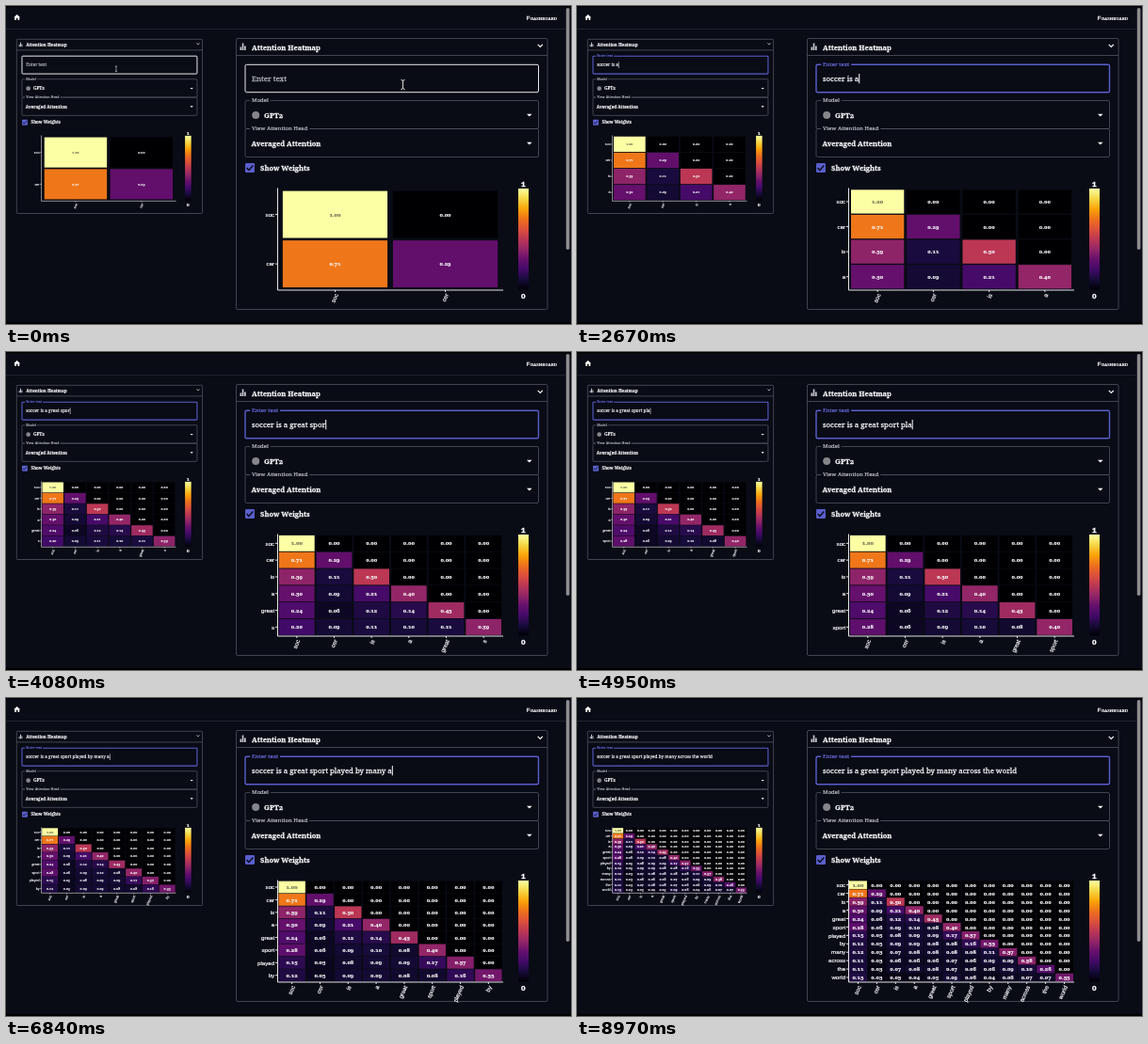
An HTML page for the animation above (9000 ms loop, 600 by 338 pixels).

```html
<!DOCTYPE html>
<html lang="en">
<head>
<meta charset="utf-8">
<title>Attention Heatmap</title>
<style>
  html, body { margin: 0; width: 100%; height: 100%; overflow: hidden; background: #090b15; }
  svg { display: block; width: 100vw; height: 100vh; }
  text {
    font-family: "Noto Serif", serif; font-variant-numeric: oldstyle-nums; white-space: pre;
    color: #f6f6f8; fill: currentColor; stroke: currentColor; stroke-width: .035em;
  }
  text.tick { font-family: "Liberation Sans", sans-serif; }
</style>
</head>
<body>
<svg id="stage" viewBox="0 0 600 338"></svg>
<script>
const LOOP = 9000, FOCUS = 480, BG = '#090b15', ACCENT = '#595fcb';
const SENTENCE = 'soccer is a great sport played by many across the world';

// [characters, first key, last key] in ms
const BURSTS = [[6, 900, 1400], [3, 1800, 2000], [2, 2150, 2250], [6, 2700, 3250],
  [5, 3500, 4050], [1, 4200, 4200], [7, 4650, 5200], [3, 5830, 6020],
  [5, 6150, 6480], [7, 6700, 7200], [4, 7880, 8090], [6, 8150, 8430]];
const KEYS = BURSTS.flatMap(([n, a, b]) =>
  Array.from({ length: n }, (_, i) => a + (b - a) * i / Math.max(1, n - 1)));

// token, time it enters the chart, weights in hundredths
const ROWS = [
  ['soc', 0, '100'],
  ['cer', 0, '71 29'],
  ['is', 2300, '39 11 50'],
  ['a', 2600, '30 9 21 40'],
  ['great', 3650, '24 6 12 14 43'],
  ['sport', 4600, '28 6 9 10 8 40'],
  ['played', 5640, '15 5 8 9 9 17 37'],
  ['by', 6450, '12 5 9 9 8 8 16 33'],
  ['many', 6950, '12 3 7 8 8 8 8 11 37'],
  ['across', 7650, '11 3 6 6 6 7 6 9 9 38'],
  ['the', 8350, '11 3 7 8 8 7 6 6 9 10 26'],
  ['world', 8800, '13 3 3 4 5 9 6 4 6 7 7 33']
].map(([token, at, w]) => ({ token, at, w: w.split(' ').map(Number) }));
const PARTIAL = { token: 's', at: 4000, until: 4600, w: [20, 9, 11, 10, 11, 39] };

const INFERNO = ['000004', '160b39', '420a68', '65106c', '932667', 'bc3754',
  'dd513a', 'ee721b', 'fca50a', 'f6d746', 'fcffa4'];
function heat(v) {
  const i = Math.min(9, Math.floor(v * 10)), f = v * 10 - i;
  const part = (s, k) => parseInt(s.substr(k, 2), 16);
  return 'rgb(' + [0, 2, 4].map(k =>
    Math.round(part(INFERNO[i], k) * (1 - f) + part(INFERNO[i + 1], k) * f)) + ')';
}

const pen = document.createElement('canvas').getContext('2d');
function textWidth(s, size) {
  pen.font = '100px "Noto Serif", serif';
  return pen.measureText(s).width * size / 100;
}

const rect = (x, y, w, h, attrs) => `<rect x="${x}" y="${y}" width="${w}" height="${h}" ${attrs}/>`;
const path = (d, attrs) => `<path d="${d}" ${attrs}/>`;
const label = (x, y, size, s, attrs = '') =>
  `<text x="${x}" y="${y + size * .36}" font-size="${size}" ${attrs}>${s}</text>`;
const notched = (x, y, size, s, attrs) =>
  rect(x - size * .3, y - size * .5, textWidth(s, size) + size * .6, size, `fill="${BG}"`) +
  label(x, y, size, s, attrs);

// band scale: n equal bands with the same padding between and around them
function bands(start, length, n, pad = .05) {
  const step = length / (n + pad);
  return i => {
    const from = start + step * (i + pad), to = start + step * (i + 1);
    return { from, to, mid: (from + to) / 2 };
  };
}

function chart(rows, X, Y, k) {
  const n = rows.length, col = bands(288, 240, n), line = bands(194, 107.7, n);
  let out = '', ticks = `M${X(288.5)} ${Y(193.5)}V${Y(302)}H${X(528)}`;
  rows.forEach((row, r) => {
    const { from, to, mid } = line(r), x = X(col(r).mid);
    for (let c = 0; c < n; c++) {
      const v = (row.w[c] || 0) / 100, b = col(c);
      out += rect(X(b.from), Y(from), X(b.to) - X(b.from), Y(to) - Y(from),
        `fill="${v ? heat(v) : '#000003'}"`);
      out += label(X(b.mid), Y(mid), 5.9 * k, v.toFixed(2),
        `text-anchor="middle" font-weight="700" ${v === 1 ? 'style="color:#77775c"' : ''}`);
    }
    out += label(X(285.2), Y(mid), 6.2 * k, row.token, 'class="tick" text-anchor="end"');
    out += `<g transform="translate(${x + 1.5 * k} ${Y(306)}) rotate(-66)">` +
      label(0, 0, 6.2 * k, row.token, 'class="tick" text-anchor="end"') + '</g>';
    ticks += `M${X(286)} ${Y(mid)}H${X(288.5)}M${x} ${Y(302)}V${Y(304)}`;
  });
  out += path(ticks, `fill="none" stroke="#e4e4e8" stroke-width="${k}"`);
  out += rect(X(544), Y(194), X(555) - X(544), Y(301.5) - Y(194), 'fill="url(#scale)"');
  out += label(X(549.3), Y(189), 8.6 * k, '1', 'text-anchor="middle" font-weight="600"');
  out += label(X(549.3), Y(307.5), 8.6 * k, '0', 'text-anchor="middle" font-weight="600"');
  return out;
}

function panel(s, left, top, sx, sy) {
  const X = x => left + (x - 244) * sx, Y = y => top + (y - 34) * sy, k = sx;
  const box = (x1, y1, x2, y2, colour, w) => rect(X(x1), Y(y1), X(x2) - X(x1), Y(y2) - Y(y1),
    `rx="${1.5 * k}" fill="none" stroke="${colour}" stroke-width="${w}"`);
  const at = (x, y, body) => `<g transform="translate(${X(x)} ${Y(y)}) scale(${k})">${body}</g>`;
  const bold = 'font-weight="600"';
  const grey = '#50535f';

  let out = box(244.5, 34.5, 575, 322.5, grey, .8);
  out += path(`M${X(244.5)} ${Y(52.5)}H${X(575)}`, `stroke="${grey}" stroke-width=".8"`);
  out += at(251.5, 43.5, path('M-3 3.5V0h1.7v3.5M-.8 3.5V-4H.9v7.5M1.5 3.5V-1h1.7v4.5', 'fill="#c4c4ca"'));
  out += label(X(261), Y(43.8), 7.5 * k, 'Attention Heatmap', bold);
  out += at(567.3, 42.2, path('M-2.6-1.3L0 1.3L2.6-1.3', 'fill="none" stroke="#fff" stroke-width="1.1"'));

  // text field
  out += box(254, 62.3, 565.5, 91.7, s.focused ? ACCENT : '#e8e8ec', s.focused ? 1.4 * Math.sqrt(k) : 1);
  const f = s.float, hint = `style="color:${s.focused ? '#676de0' : '#b4b4ba'}"`;
  out += (f > .8 ? notched : label)(X(261), Y(76.8 - 15.1 * f), (7.85 - 1.85 * f) * k, 'Enter text', hint);
  out += label(X(261), Y(76.8), 7.85 * k, s.typed);
  if (s.caret) {
    const x = X(261) + textWidth(s.typed, 7.85 * k) + .5 * k;
    out += path(`M${x} ${Y(72)}V${Y(82.3)}`, `stroke="#fff" stroke-width="${k}"`);
  }
  if (s.pointer) {
    out += at(421.5, 83.5, path('M-2-5Q0-5 0-3.5Q0-5 2-5M0-4V4M-2 5Q0 5 0 3.5Q0 5 2 5',
      'fill="none" stroke="#ddd" stroke-width="1"'));
  }

  // selects
  out += box(254, 100.5, 565.5, 130.5, grey, .8) + box(254, 130.5, 565.5, 160.5, grey, .8);
  const small = 'style="color:#b9bac1"';
  out += notched(X(261), Y(100), 6 * k, 'Model', small);
  out += notched(X(261), Y(130.2), 6 * k, 'View Attention Head', small);
  out += at(265.2, 116, '<circle r="4" fill="#85858b"/>');
  out += label(X(274), Y(116), 7.7 * k, 'GPT2', bold);
  out += label(X(260.5), Y(146.2), 7.5 * k, 'Averaged Attention', bold);
  for (const y of [116, 146]) out += at(555.8, y, path('M-2.8-1.3H2.8L0 1.5Z', 'fill="#fff"'));

  // checkbox
  out += at(259, 172, rect(-5, -5, 10, 10, `rx="1.2" fill="${ACCENT}"`) +
    path('M-3.4 0L-1.2 2.4L3.4-2.4', `fill="none" stroke="${BG}" stroke-width="1.4"`));
  out += label(X(270), Y(172), 7.5 * k, 'Show Weights', bold);
  return out + chart(s.rows, X, Y, k);
}

const FRAME = '<defs><linearGradient id="scale" x1="0" y1="1" x2="0" y2="0">' +
  INFERNO.map((c, i) => `<stop offset="${i / 10}" stop-color="#${c}"/>`).join('') +
  '</linearGradient></defs>' +
  rect(0, 0, 600, 338, `fill="${BG}"`) +
  rect(0, 0, 600, 1.2, 'fill="#000"') + rect(0, 336, 600, 2, 'fill="#000"') +
  path('M0 24.5H594', 'stroke="#20232f" stroke-width="1"') +
  path('M8.2 12.2L11.7 9L15.2 12.2H14.2V15H12.5V12.8H10.9V15H9.2V12.2Z', 'fill="#fff"') +
  path('M553 11.2H556.4M553.4 11V15M553 13H556.4', 'stroke="#fff" stroke-width=".8"') +
  label(556.9, 13, 4.3, 'DASHBOARD', 'font-weight="700"') +
  rect(594.8, 2, 3.6, 257, 'rx="1.8" fill="#8d8d91"');

function stateAt(t) {
  const count = KEYS.filter(k => k <= t).length;
  const lastInput = count ? KEYS[count - 1] : FOCUS;
  const rows = ROWS.filter(r => r.at <= t);
  if (t >= PARTIAL.at && t < PARTIAL.until) rows.push(PARTIAL);
  const p = Math.min(1, Math.max(0, (t - FOCUS) / 200));
  return {
    rows,
    typed: SENTENCE.slice(0, count),
    focused: t >= FOCUS,
    float: 1 - (1 - p) ** 3,
    caret: t >= FOCUS && (t - lastInput) % 1000 < 500,
    pointer: t < KEYS[0]
  };
}

const stage = document.getElementById('stage');
let shown = '';
function tick() {
  const s = stateAt(performance.now() % LOOP);
  const key = JSON.stringify(s);
  if (key !== shown) {
    shown = key;
    stage.innerHTML = FRAME + panel(s, 11, 35, .597, .643) + panel(s, 244, 34, 1, 1);
  }
  requestAnimationFrame(tick);
}
tick();
</script>
</body>
</html>
```
